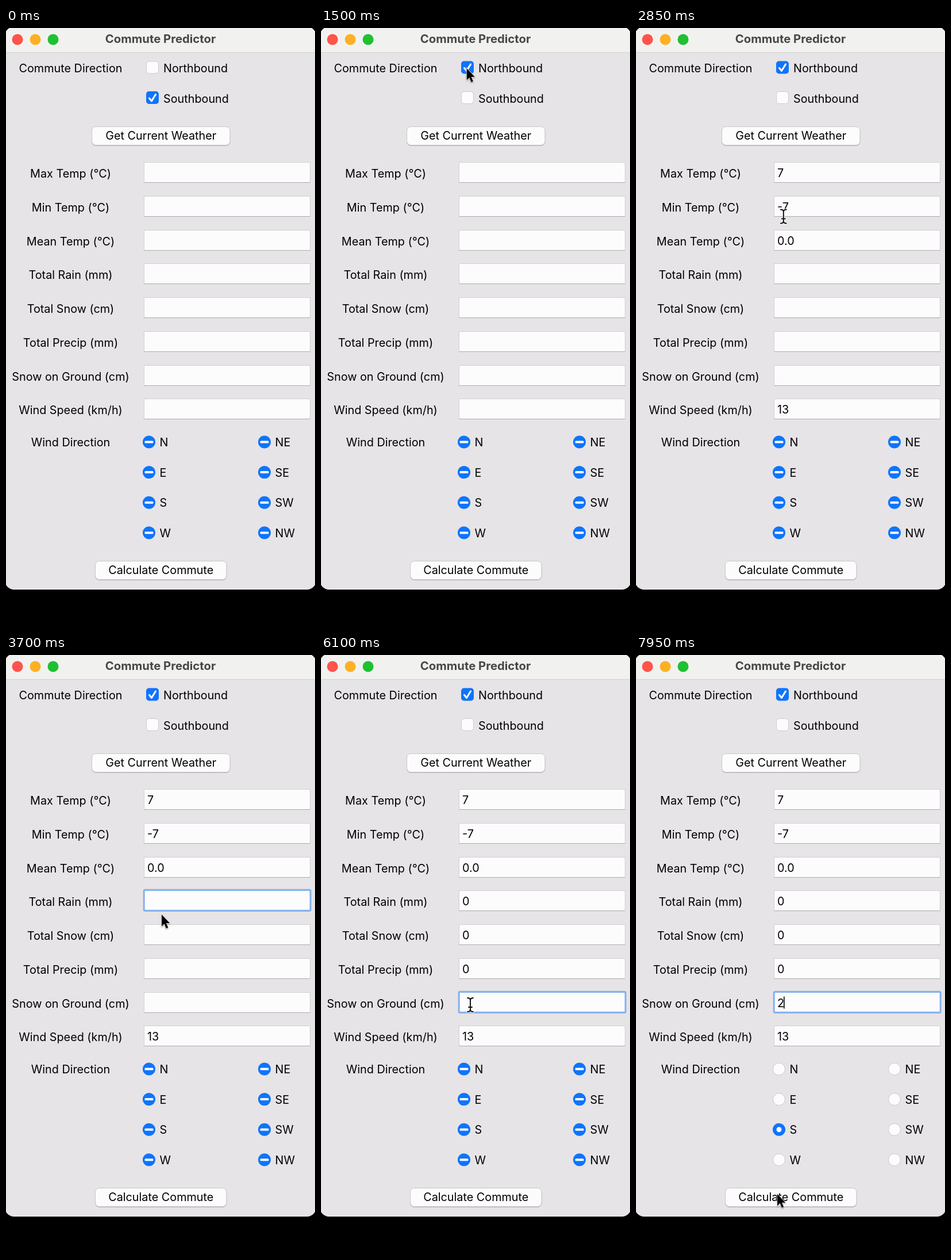
An HTML page that plays this animation: 538x1041 px, repeating every 8 s.

```html
<!DOCTYPE html>
<html lang="en">
<head>
<meta charset="utf-8">
<title>Commute Predictor</title>
<style>
  html, body { margin: 0; width: 100%; height: 100%; overflow: hidden; background: #000; }
  svg { display: block; width: 100vw; height: 100vh; }
  text { font: 400 19.8px Inter, sans-serif; fill: #000; }
  .title { font-weight: 700; font-size: 20.3px; fill: #474747; }
  .mid { text-anchor: middle; }
  .field { fill: #fdfcfd; stroke: #d2d0d2; stroke-width: 1; }
  .ring { fill: none; stroke: #86b2ee; stroke-width: 3.1; }
  .button { fill: #fdfcfd; stroke: #c9c7c9; stroke-width: 1; filter: drop-shadow(0 1px .6px #0003); }
  .off { fill: #fdfcfd; stroke: #cccacc; stroke-width: 1; }
  .on { fill: #0f74fb; }
  .tick { fill: none; stroke: #fff; stroke-width: 3; stroke-linecap: round; stroke-linejoin: round; }
  #arrow { filter: drop-shadow(0 1.5px 1.2px #0006); }
</style>
</head>
<body>
<svg id="stage" viewBox="0 0 538 1041" preserveAspectRatio="xMinYMin meet">
  <defs><clipPath id="frame"><rect x="-2" y="-2" width="542" height="978" rx="16"/></clipPath></defs>
  <rect width="538" height="1041" fill="#000"/>
  <g clip-path="url(#frame)">
    <rect width="538" height="976" fill="#e6e4e6"/>
    <rect width="538" height="42" fill="#f1f2ef"/>
    <rect y="42" width="538" height="1" fill="#d3d2d2"/>
  </g>
  <g id="form"></g>
  <g id="arrow">
    <path d="M0 0V20.5L4.7 16.2L7.8 24.2L11.3 22.8L8 15H14.2Z" fill="#000" stroke="#fff" stroke-width="1.4" paint-order="stroke"/>
  </g>
  <g id="beam" fill="none" stroke-linecap="round">
    <path d="M-5 -12Q0 -12 0 -8V8Q0 12 -5 12M5 -12Q0 -12 0 -8V8Q0 12 5 12M-3 4H3" stroke="#fff" stroke-width="4"/>
    <path d="M-5 -12Q0 -12 0 -8V8Q0 12 -5 12M5 -12Q0 -12 0 -8V8Q0 12 5 12M-3 4H3" stroke="#111" stroke-width="2"/>
  </g>
</svg>
<script>
const LOOP = 8000, ROW = 58.75, FIELD_TOP = 233, FIELD_H = 36;
const form = document.getElementById('form');
const arrow = document.getElementById('arrow');
const beam = document.getElementById('beam');

function add(tag, attrs, parent = form) {
  const el = document.createElementNS('http://www.w3.org/2000/svg', tag);
  for (const key in attrs) el.setAttribute(key, attrs[key]);
  return parent.appendChild(el);
}
function label(x, y, content, cls = '') {
  const el = add('text', { x, y, class: cls });
  el.textContent = content;
  return el;
}
const show = (el, visible) => el.setAttribute('visibility', visible ? 'visible' : 'hidden');

['#ff534c', '#fdb024', '#1fc032'].forEach((fill, i) => add('circle', { cx: 20 + 31 * i, cy: 20, r: 9.5, fill }));
label(269, 26, 'Commute Predictor', 'title mid');
label(112.5, 77, 'Commute Direction', 'mid');
label(112.5, 727, 'Wind Direction', 'mid');

function button(x, y, w, content) {
  add('rect', { x, y, width: w, height: 32, rx: 7, class: 'button' });
  label(x + w / 2, y + 22, content, 'mid');
}
button(149.5, 171.5, 240.5, 'Get Current Weather');
button(155.5, 926.5, 228.5, 'Calculate Commute');

function checkbox(cy, content) {
  add('rect', { x: 244.5, y: cy - 10.5, width: 21, height: 21, rx: 5, class: 'off' });
  const mark = add('g', {});
  add('rect', { x: 244, y: cy - 11, width: 22, height: 22, rx: 5, class: 'on' }, mark);
  add('path', { d: `M249.5 ${cy + 1}l4 5l7-11.5`, class: 'tick' }, mark);
  label(274, cy + 8.5, content);
  return mark;
}
const north = checkbox(68.5, 'Northbound');
const south = checkbox(121, 'Southbound');

// Each field: label, value, time the value appears, time focus is gained
const WEATHER = 2500;
const fields = [
  ['Max Temp (°C)', '7', WEATHER],
  ['Min Temp (°C)', '-7', WEATHER],
  ['Mean Temp (°C)', '0.0', WEATHER],
  ['Total Rain (mm)', '0', 3750, 3100],
  ['Total Snow (cm)', '0', 4150, 4000],
  ['Total Precip (mm)', '0', 5160, 4900],
  ['Snow on Ground (cm)', '2', 6240, 5390],
  ['Wind Speed (km/h)', '13', WEATHER]
].map(([name, value, filled, focus], i) => {
  const y = Math.round(FIELD_TOP + ROW * i);
  label(112.5, y + 27, name, 'mid');
  add('rect', { x: 240.5, y: y + .5, width: 289, height: FIELD_H - 1, class: 'field' });
  add('rect', { x: 240.5, y: y + FIELD_H - 1, width: 289, height: 1, fill: '#adabad' });
  return { y, filled, focus, text: label(246, y + 25.5, value) };
});
const focusRing = add('rect', { x: 240.2, width: 290, height: 36, rx: 2, class: 'ring' });
const caret = add('rect', { width: 1.6, height: 21, fill: '#000' });

const radios = ['N', 'NE', 'E', 'SE', 'S', 'SW', 'W', 'NW'].map((name, i) => {
  const cx = i % 2 ? 450 : 249, cy = 719.5 + 52.6 * (i >> 1);
  add('circle', { cx, cy, r: 10.5, class: 'off' });
  const mixed = add('g', {}), chosen = add('g', {});
  for (const g of [mixed, chosen]) add('circle', { cx, cy, r: 11, class: 'on' }, g);
  add('rect', { x: cx - 7.5, y: cy - 2, width: 15, height: 4, rx: 1.5, fill: '#fff' }, mixed);
  add('circle', { cx, cy, r: 4.5, fill: '#fff' }, chosen);
  label(cx + 18.5, cy + 7.5, name);
  return { name, mixed, chosen };
});

// Pointer stops: time, x, y
const path = [
  [450, 24, 300], [850, 195.5, 194], [1350, 253, 70], [1600, 254, 70],
  [2150, 236, 173], [2300, 240, 183], [2600, 241, 185], [3050, 268, 428],
  [3200, 269, 430], [3500, 271, 451], [3750, 271, 451], [3980, 268, 486],
  [4250, 267, 488], [4750, 263, 533.5], [4900, 262, 543], [5120, 262, 545],
  [5370, 261, 602], [5730, 260, 608], [6350, 260, 608], [7200, 250, 826],
  [7400, 250, 826], [7880, 246, 936], [8000, 246, 937]
];
function pointerAt(t) {
  const i = path.findIndex(stop => stop[0] > t);
  const [t0, x0, y0] = path[i - 1], [t1, x1, y1] = path[i];
  const u = (t - t0) / (t1 - t0), k = u * u * (3 - 2 * u);
  return [x0 + (x1 - x0) * k, y0 + (y1 - y0) * k];
}

function drawCaret(t, field) {
  show(focusRing, field);
  const typed = field && t >= field.filled;
  show(caret, field && (t - (typed ? field.filled : field.focus)) % 850 < 570);
  if (!field) return;
  focusRing.setAttribute('y', field.y - .6);
  caret.setAttribute('x', typed ? 257 : 246.5);
  caret.setAttribute('y', field.y + 7.5);
}

function drawPointer(t) {
  const visible = t >= path[0][0];
  const [x, y] = visible ? pointerAt(t) : [0, 0];
  const overField = x > 240 && x < 530 && fields.some(f => y > f.y && y < f.y + FIELD_H);
  for (const el of [arrow, beam]) el.setAttribute('transform', `translate(${x} ${y})`);
  show(arrow, visible && !overField);
  show(beam, visible && overField);
}

function draw(t) {
  show(north, t >= 1450);
  show(south, t < 1450);
  for (const f of fields) show(f.text, t >= f.filled);
  for (const r of radios) {
    show(r.mixed, t < 7300);
    show(r.chosen, t >= 7300 && r.name === 'S');
  }
  drawCaret(t, fields.filter(f => t >= f.focus).pop());
  drawPointer(t);
}

const start = performance.now();
function tick() {
  draw((performance.now() - start) % LOOP);
  requestAnimationFrame(tick);
}
tick();
</script>
</body>
</html>
```
